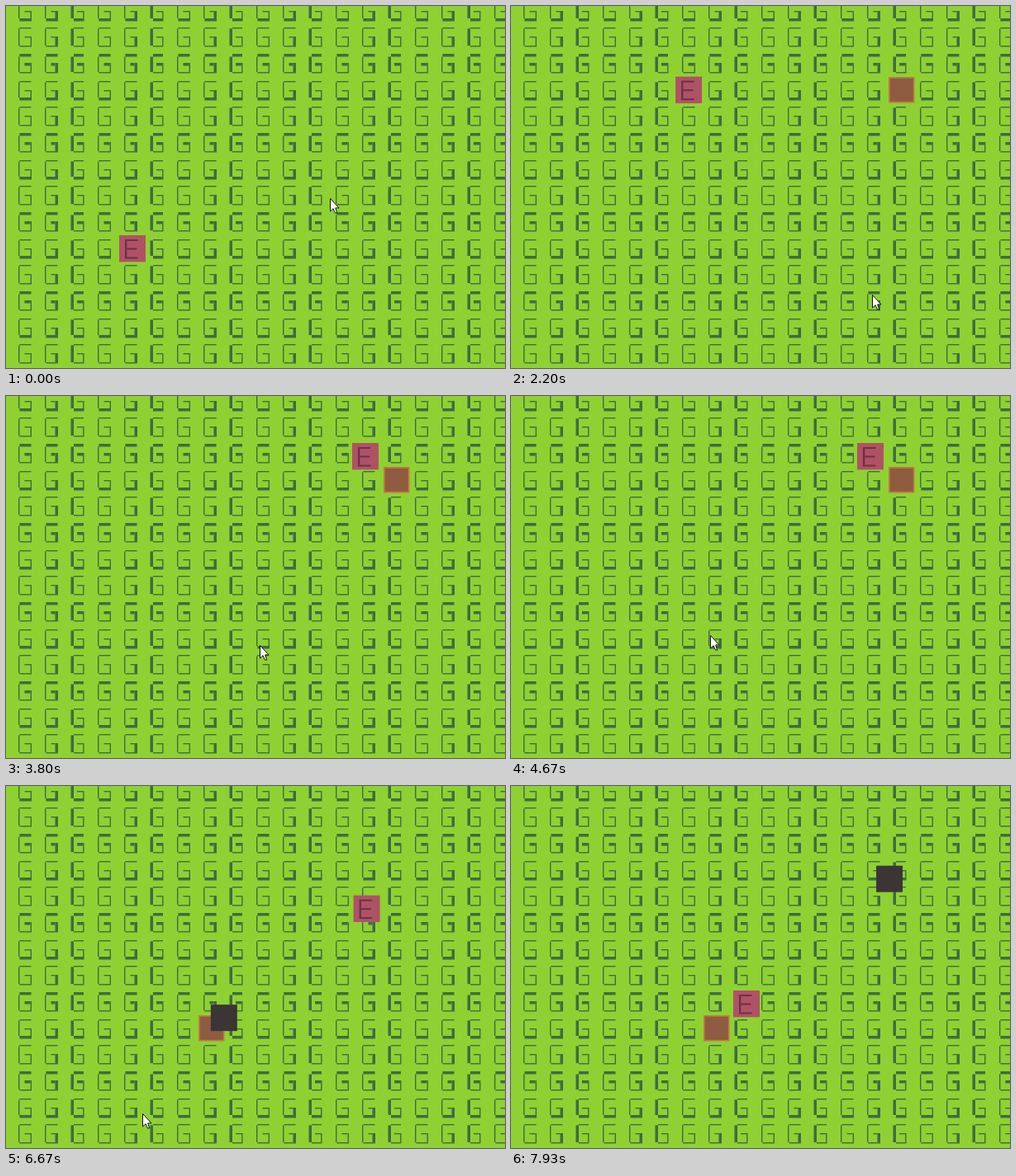
An HTML page with a canvas for the animation above (8 s loop, 604 px wide and 439 px high).

```html
<!DOCTYPE html>
<html lang="en">
<head>
<meta charset="utf-8">
<title>Grid chase</title>
<style>
  html, body { margin: 0; width: 100%; height: 100%; overflow: hidden; background: #8fd132; }
  canvas { display: block; }
</style>
</head>
<body>
<canvas width="604" height="439"></canvas>
<script>
const W = 604, H = 439, LOOP = 8000, STEP = 1000 / 15, CELL = 32;
const RANGE = 280, RELOAD = 1000, WARMUP = 520, SHOT_SPEED = 0.203;
const ctx = document.querySelector('canvas').getContext('2d');

const linear = k => k;
const easeOut = k => 1 - (1 - k) ** 2;

// One stretch of travel along an SVG path
function leg(from, to, d, ease = linear) {
  const path = document.createElementNS('http://www.w3.org/2000/svg', 'path');
  path.setAttribute('d', d);
  return { from, to, path, ease, length: path.getTotalLength() };
}

const walker = [
  leg(1000, 3533, 'M137 278Q165 215 165 186C165 130 190 57 270 57Q345 51 419 57'),
  leg(5533, 5667, 'M419 57L430 60'),
  leg(6330, 7650, 'M430 60C427 110 415 205 365 231Q310 247 269 248')
];
const pointer = [
  leg(0, 867, 'M392 233C300 210 410 160 470 99'),
  leg(1000, 1870, 'M470 99L454 314L437 350', easeOut),
  leg(2867, 3800, 'M437 350Q350 350 307 302'),
  leg(4000, 4667, 'M307 302L241 290'),
  leg(6067, 6933, 'M241 290L131 445')
];
const towers = [
  { from: 990, to: 5650, x: 457, y: 86 },
  { from: 6050, to: LOOP, x: 233, y: 278 }
];

const arrow = new Path2D('M.5.5V16L4.1 12.7 6.4 18H8.7L6.7 11.9H11Z');

function at(legs, t) {
  const { from, to, path, ease, length } = legs.findLast(l => l.from <= t) || legs[0];
  const k = Math.min(1, Math.max(0, (t - from) / (to - from)));
  return path.getPointAtLength(ease(k) * length);
}

function box(g, color, x, y, w, h) {
  g.fillStyle = color;
  g.fillRect(x, y, w, h);
}

// Stroke weights repeat every three columns and rows
function makeField() {
  const field = document.createElement('canvas');
  field.width = W;
  field.height = H;
  const g = field.getContext('2d');
  box(g, '#8fd132', 0, 0, W, H);
  const bar = (x, y, w, h) => box(g, '#3e6c42', x, y, w, h);
  const weight = thick => thick ? 3.5 : 1.4;
  for (let row = 0; row < 14; row++) {
    for (let col = 0; col < 19; col++) {
      const x = 15 + col * CELL - (col % 3 === 2 ? 0.5 : 0);
      const y = -6 + row * CELL + (row % 3 === 0 ? 1 : 0);
      const left = weight(col % 3 === 2), right = weight(col % 3 === 1);
      const top = weight(row % 3 === 2), base = weight(row % 3 === 0);
      bar(x + left, y, 15.5 - left, top);
      bar(x, y + top, left, 23.5 - top - base);
      bar(x + left, y + 23.5 - base, 16 - left, base);
      bar(x + 16 - right, y + 11, right, 12.5 - base);
      bar(x + 7.5, y + 11, 8.5 - right, top);
    }
  }
  return field;
}
const field = makeField();

// Follow a shot from its launch; null once it has hit the walker
function shotAt(tower, launch, t) {
  const aim = at(walker, launch);
  const dx = aim.x - tower.x, dy = aim.y - tower.y, reach = Math.hypot(dx, dy);
  if (reach > RANGE) return null;
  for (let age = t - launch; age >= 0; age -= STEP) {
    const k = age * SHOT_SPEED / reach;
    const goal = at(walker, launch + age);
    if (Math.hypot(tower.x + dx * k - goal.x, tower.y + dy * k - goal.y) < CELL) return null;
  }
  const k = (t - launch) * SHOT_SPEED / reach;
  return { x: tower.x + dx * k, y: tower.y + dy * k };
}

function drawTower(tower, t) {
  const { from, x, y } = tower;
  box(ctx, '#c07b42', x, y, 31.5, 31.5);
  box(ctx, '#8f5b41', x + 1.7, y + 1.7, 28.1, 28.1);
  for (let launch = from + WARMUP; launch <= t; launch += RELOAD) {
    const shot = shotAt(tower, launch, t);
    if (shot) box(ctx, '#3b3536', shot.x, shot.y, 32, 32);
  }
}

function drawWalker({ x, y }) {
  box(ctx, '#b05265', x, y, 32, 32.3);
  const bar = (dx, dy, w, h) => box(ctx, '#6a304b', x + 7 + dx, y + 5 + dy, w, h);
  bar(0, 0, 2.3, 23.5);
  bar(2.3, 0, 13.2, 2);
  bar(2.3, 10.5, 12, 2);
  bar(2.3, 21.5, 13.2, 2);
}

function drawPointer({ x, y }) {
  ctx.save();
  ctx.translate(Math.round(x), Math.round(y));
  ctx.fillStyle = '#fff';
  ctx.strokeStyle = '#111';
  ctx.fill(arrow);
  ctx.stroke(arrow);
  ctx.restore();
}

function draw(t) {
  ctx.drawImage(field, 0, 0);
  for (const tower of towers) {
    if (t >= tower.from && t < tower.to) drawTower(tower, t);
  }
  drawWalker(at(walker, t));
  drawPointer(at(pointer, t));
}

const start = performance.now();
function tick() {
  const t = (performance.now() - start) % LOOP;
  draw(Math.floor(t / STEP + 0.1) * STEP % LOOP);
  requestAnimationFrame(tick);
}
tick();
</script>
</body>
</html>
```
